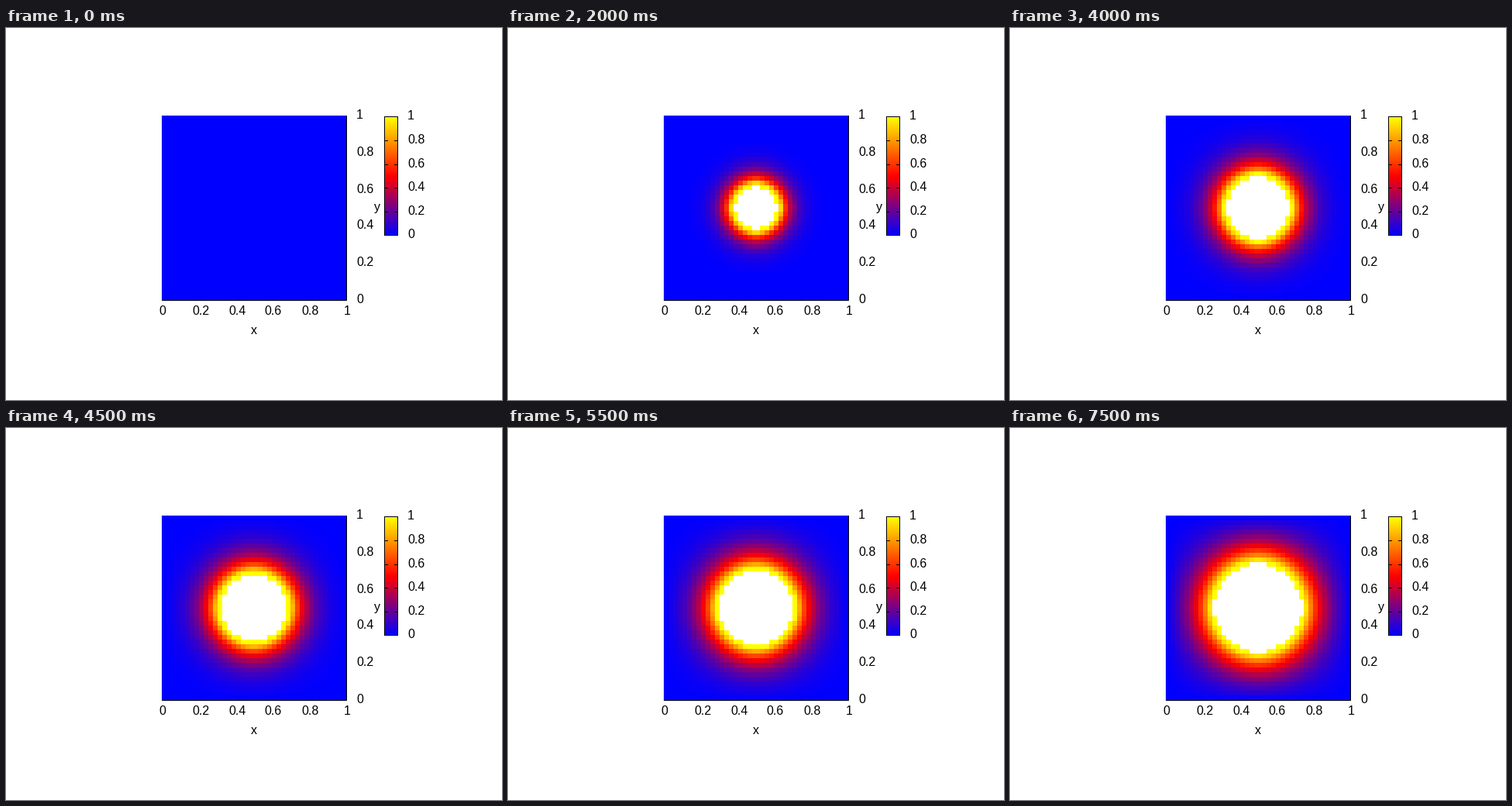
Animation, 640 px wide and 480 px high, one loop 8000 ms. Source, as a matplotlib script:

```python
import numpy as np
import matplotlib.pyplot as plt
from matplotlib.animation import FuncAnimation
from matplotlib.colors import LinearSegmentedColormap

W, H, DPI = 640, 480, 100
PX = 72 / DPI                # one pixel in points
FRAMES, INTERVAL = 16, 500
CELLS = 40
STEPS = 32                   # solver steps per frame
RATE = 3.2 / STEPS           # D * dt / h^2
SOURCE = 80 / STEPS          # heat added to the middle node per step

plt.rcParams["font.family"] = "Liberation Sans"
cmap = LinearSegmentedColormap.from_list("heat", ["blue", "red", "yellow"], N=256)
cmap.set_bad("white")

# cell edges truncate to whole pixels, measured from the middle
edges = np.trunc(5.95 * (np.arange(CELLS + 1) - CELLS // 2)).astype(int)
widths = np.diff(edges)


def shade(u):
    """Mean of the corners per cell; cells wholly above 1 stay empty."""
    corners = np.array([u[1:, 1:], u[:-1, 1:], u[1:, :-1], u[:-1, :-1]])
    cells = np.clip(corners.mean(axis=0), 0, 1)
    cells[corners.min(axis=0) > 1] = np.nan
    return np.ma.masked_invalid(cells.repeat(widths, axis=0).repeat(widths, axis=1))


def solve():
    """Heat spreading from a point source, with cold walls."""
    u = np.zeros((CELLS + 1, CELLS + 1))
    mid = CELLS // 2
    fields = []
    for _ in range(FRAMES):
        fields.append(shade(u))
        for _ in range(STEPS):
            lap = (u[2:, 1:-1] + u[:-2, 1:-1] + u[1:-1, 2:] + u[1:-1, :-2]
                   - 4 * u[1:-1, 1:-1])
            u[1:-1, 1:-1] += RATE * lap
            u[mid, mid] += SOURCE
    return fields


fields = solve()

fig = plt.figure(figsize=(W / DPI, H / DPI), dpi=DPI, facecolor="white")
ax = fig.add_axes([0, 0, 1, 1])
ax.axis("off")


def label(x, base, text, ha="center"):
    ax.text(x, base, text, ha=ha, va="baseline", fontsize=16 * PX, color="black")


def line(xs, ys):
    ax.plot(xs, ys, color="black", lw=PX, snap=False,
            solid_capstyle="projecting", solid_joinstyle="miter")


def image(data, extent):
    return ax.imshow(data, cmap=cmap, vmin=0, vmax=1, interpolation="nearest",
                     extent=extent, aspect="auto")


heat = image(fields[0], (201, 439, 351, 113))
line([201.5, 439.5, 439.5], [351.5, 351.5, 113.5])

image(np.linspace(1, 0, 154)[:, None], (488, 506, 268, 114))
line([488.5, 505.5, 505.5, 488.5, 488.5], [114.5, 114.5, 267.5, 267.5, 114.5])

names = ["0", "0.2", "0.4", "0.6", "0.8", "1"]
x_pos = [202, 251, 299, 345, 393, 440]
y_base = [355, 307, 259, 213, 165, 117]
bar_base = [271, 241, 210, 180, 149, 118]
for name, x, yb, bb in zip(names, x_pos, y_base, bar_base):
    label(x, 370, name)
    label(452, yb, name, "left")
    label(518, bb, name, "left")
for y in (145.5, 176.5, 206.5, 237.5):
    line([488.5, 492.5], [y, y])
    line([501.5, 505.5], [y, y])
label(320, 395, "x")
label(479, 236, "y")

ax.set_xlim(0, W)
ax.set_ylim(H, 0)


def draw(i):
    heat.set_data(fields[i])
    return [heat]


anim = FuncAnimation(fig, draw, frames=FRAMES, interval=INTERVAL,
                     repeat=True, repeat_delay=0, blit=False)
plt.show()
```
